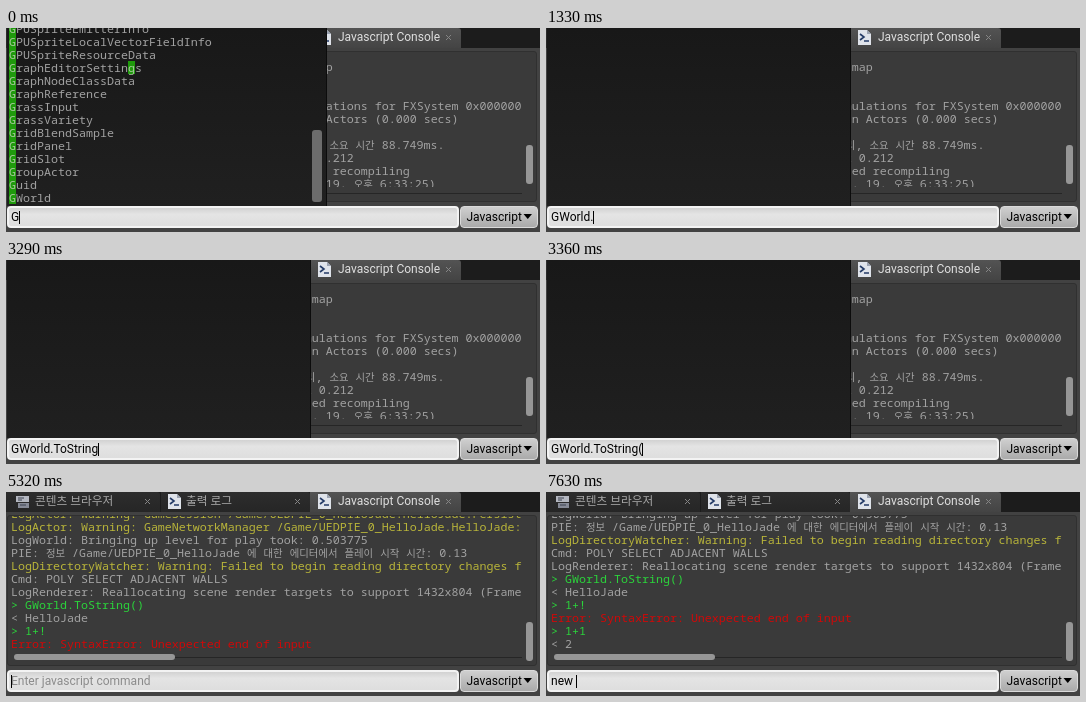
Write an HTML page that moves like this. It is 534x204 px and loops after 8000 ms.

```html
<!DOCTYPE html>
<html lang="ko">
<head>
<meta charset="utf-8">
<title>Javascript Console</title>
<style>
html, body { margin: 0; width: 100%; height: 100%; overflow: hidden; background: #1c1c1c; }
#stage {
  position: relative; width: 534px; height: 204px; overflow: hidden; background: #1c1c1c;
  font: 12px/14px Roboto, "Noto Sans CJK KR", "Noto Sans CJK", sans-serif; white-space: pre;
}
#stage div, #stage svg { position: absolute; box-sizing: border-box; }
#stage [hidden] { display: none; }

.tab { top: 0; height: 20px; background: linear-gradient(#2d2d2d, #262626); color: #a8a8a8; border-radius: 0 3px 0 0; }
.tab.on { background: linear-gradient(#535353, #444); color: #e0e0e0; }
.tab .name { top: 2px; left: 28px; }
.tab .ko { font-size: 11.7px; left: 25px; }
.tab svg { top: 1px; left: 5px; }
.tab.on svg { left: 6px; }
#stage .tab .x { top: 6px; left: auto; right: 9px; }

#panel { left: 0; top: 20px; width: 534px; height: 184px; background: #424242; }
#frame { left: 1px; top: 23px; width: 530px; height: 151px; background: #3a3a3a; border: 1px solid #303030; border-radius: 3px; }
#log { left: 0; top: 24px; width: 516px; height: 135px; overflow: hidden; }
.line, .row { font: 11.667px/13px "Noto Sans Mono", "DejaVu Sans Mono", monospace; height: 13px; color: #a2a2a2; }
.line { left: 5px; }
.line i { font: 10.4px/0 "Noto Sans CJK KR", "Noto Sans CJK", sans-serif; }
.warn { color: #b9b53a; }
.cmd { color: #2bd43b; }
.err { color: #d00808; }
#track { left: 8px; top: 165px; width: 508px; height: 1px; background: #262626; }
.thumb { background: #969696; border-radius: 3px; }
#hbar { left: 8px; top: 162px; width: 161px; height: 6px; }
#vbar { left: 520px; width: 7px; height: 39px; }

#popup { left: 1px; top: 0; height: 178px; background: linear-gradient(#181818, #202020); border-right: 1px solid #0c0c0c; overflow: hidden; }
.row { left: 2px; }
.row b { font-weight: 400; color: #a5c99a; background: #1f9a0c; display: inline-block; height: 13px; }
#pbar { left: 305px; width: 10px; background: #6c6c6c; }

#input, #lang { top: 178px; height: 22px; border-radius: 4px; }
#input { left: 1px; width: 452px; background: linear-gradient(#d2d2d2, #e4e4e4 35%, #dedede); border: 2px solid #f3f3f3; }
#lang { left: 454px; width: 78px; background: linear-gradient(#cfcfcf, #aaa); border: 1px solid #dadada; color: #000; }
#lang div { left: 5.5px; top: 3px; }
#lang svg { left: 62px; top: 7px; }
#text { left: 5px; top: 182px; color: #000; }
#text.empty { color: #8b8b8b; }
#caret { top: 183px; width: 1px; height: 13px; background: #000; }
</style>
</head>
<body>
<div id="stage">
  <div class="tab" style="left:0;width:154px">
    <svg style="left:9px" width="16" height="17"><path d="M1 3h13v6H1z" fill="#b4b7c0"/><path d="M3 10h11v5H3z" fill="#868a96"/><path d="M3 5h6M3 7h4M5 12h6" stroke="#3c4250"/></svg>
    <div class="name ko" style="left:29px">콘텐츠 브라우저</div>
  </div>
  <div class="tab" style="left:155px;width:149px"><div class="name ko">출력 로그</div></div>
  <div class="tab on" style="left:304px;width:151px"><div class="name">Javascript Console</div></div>
  <div id="panel"></div>
  <div id="frame"></div>
  <div id="log"></div>
  <div id="track"></div>
  <div id="hbar" class="thumb"></div>
  <div id="vbar" class="thumb"></div>
  <div id="popup"><div id="pbar" class="thumb"></div></div>
  <div id="input"></div>
  <div id="text"></div>
  <div id="caret"></div>
  <div id="lang"><div>Javascript</div><svg width="10" height="6"><path d="M.5 0h8.5L4.75 5z" fill="#000"/></svg></div>
</div>
<script>
const $ = id => document.getElementById(id);
const LOOP = 8000, PITCH = 13;

function add(parent, cls, top) {
  const el = document.createElement('div');
  el.className = cls;
  el.style.top = top + 'px';
  return parent.appendChild(el);
}

// Puts text into el, wrapping every part that matches re in the given tag.
function fill(el, text, re, tag) {
  text.split(re).forEach((part, i) => {
    if (!part) return;
    const node = i % 2 ? document.createElement(tag) : document.createTextNode('');
    node.textContent = part;
    el.append(node);
  });
}

const closeX = '<svg class="x" width="7" height="7"><path d="M1 1l5 5M6 1l-5 5" stroke="#858585"/></svg>';
const promptIcon = '<svg width="17" height="17"><path d="M2 1h9l4 4v11H2z" fill="#dfe3ea"/>' +
  '<path d="M11 1v4h4" fill="#9ba3b2"/><path d="M4 5l4 3-4 3M8 12h5" fill="none" stroke="#233a66" stroke-width="1.6"/></svg>';
document.querySelectorAll('.tab').forEach((tab, i) =>
  tab.insertAdjacentHTML('beforeend', (i ? promptIcon : '') + closeX));

const before = [
  'LogLoader: Finished saving all of the next map', '', '',
  'LogParticles: Destroying 2 GPU particle simulations for FXSystem 0x000000',
  'LogEditorServer: Finished looking for orphan Actors (0.000 secs)', '',
  'MapCheck: 정보: 맵 검사 완료: 오류 0개, 경고 0개 처리, 소요 시간 88.749ms.',
  'LogTimer: Time in seconds for the last tick 0.212',
  'LogReloads: Module check done, nothing needed recompiling',
  'LogReload: Finished scan of module (2015. 6. 19. 오후 6:33:25)'
];
const watcher = 'LogDirectoryWatcher: Warning: Failed to begin reading directory changes f';
const world = '/Game/UEDPIE_0_HelloJade';
const after = [
  watcher,
  `LogWorld: Bringing World ${world}.HelloJade up for play (`,
  `LogActor: Warning: GameSession ${world}.HelloJade:Persist`,
  `LogActor: Warning: GameNetworkManager ${world}.HelloJade:`,
  'LogWorld: Bringing up level for play took: 0.503775',
  `PIE: 정보 ${world} 에 대한 에디터에서 플레이 시작 시간: 0.13`,
  watcher,
  'Cmd: POLY SELECT ADJACENT WALLS',
  'LogRenderer: Reallocating scene render targets to support 1432x804 (Frame',
  '> GWorld.ToString()', '< HelloJade',
  '> 1+!', 'Error: SyntaxError: Unexpected end of input',
  '> 1+1', '< 2'
];

const tone = s => /Warning/.test(s) ? 'warn' : s[0] === '>' ? 'cmd' : /^Error/.test(s) ? 'err' : '';

// One log view; lastTop is the stage position of its bottom line.
function logView(lines, lastTop) {
  const view = add($('log'), 'view', 0);
  lines.forEach((s, i) => {
    const top = lastTop - (lines.length - 1 - i) * PITCH - 24;
    fill(add(view, 'line ' + tone(s), top), s, /([가-힣]+)/, 'i');
  });
  return view;
}
const logs = [logView(before, 149), ...[11, 13, 15].map(n => logView(after.slice(0, n), 145))];

function rowsView(names, re) {
  const view = add($('popup'), 'rows', 0);
  names.forEach((s, i) => fill(add(view, 'row', i * PITCH - 6), s, re, 'b'));
  return view;
}
const globals = `GPUSpriteEmitterInfo GPUSpriteLocalVectorFieldInfo GPUSpriteResourceData
  GraphEditorSettings GraphNodeClassData GraphReference GrassInput GrassVariety GridBlendSample
  GridPanel GridSlot GroupActor Guid GWorld`.split(/\s+/);
const members = `SphereTraceSingle_NEW SphereTraceSingleByObject_DEPRECATED SphereTraceSingleForObjects
  StaticClass StreamingLevels StreamingLevelsPrefix SuggestProjectileVelocity ThumbnailInfo toJSON
  ToString UnloadStreamLevel UnpauseTimerbyFunctionName UnpauseTimerbyHandle WorldComposition`
  .split(/\s+/).map(s => 'GWorld.' + s);
const lists = {
  globals: { view: rowsView(globals, /(g)/i), bar: 102 },
  members: { view: rowsView(members, /(GWorld\.)/), bar: 127 }
};

// Tracks hold [start time, value] pairs; typed() adds one character per time.
const typed = (base, chars, times) => times.map((t, i) => [t, base + chars.slice(0, i + 1)]);
const text = [
  [0, 'G'],
  ...typed('G', 'World.', [840, 980, 1050, 1120, 1260, 1330]),
  ...typed('GWorld.', 'ToString()', [2590, 2730, 2940, 3010, 3080, 3150, 3220, 3290, 3360, 3430]),
  [3640, ''], ...typed('', '1+!', [4970, 5040, 5110]),
  [5320, ''], ...typed('', '1+1', [5880, 5950, 6020]),
  [6160, ''], ...typed('', 'new ', [7350, 7420, 7560, 7630])
];
const caret = [
  [0, 1], [70, 0], [490, 1], [1820, 0], [2240, 1], [3780, 0], [4060, 1], [4550, 0], [4970, 1],
  [5390, 0], [5880, 1], [6230, 0], [6370, 1], [6790, 0], [7210, 1]
];
const popup = [[0, 'globals'], [840, 'blank'], [1400, 'members'], [2590, 'blank'], [3500, '']];
const log = [[0, 0], [3640, 1], [5320, 2], [6160, 3]];

const at = (track, t) => track.findLast(([start]) => start <= t)[1];

const pen = document.createElement('canvas').getContext('2d');
pen.font = '12px Roboto, sans-serif';

function draw(t) {
  const value = at(text, t), menu = at(popup, t), list = lists[menu], stage = at(log, t);

  $('text').textContent = value || 'Enter javascript command';
  $('text').className = value ? '' : 'empty';
  $('caret').hidden = !at(caret, t);
  $('caret').style.left = Math.floor(5.1 + pen.measureText(value).width) + 'px';

  $('popup').hidden = !menu;
  $('popup').style.width = (list ? 320 : 304) + 'px';
  for (const key in lists) lists[key].view.hidden = key !== menu;
  $('pbar').hidden = !list;
  if (list) {
    $('pbar').style.top = list.bar + 'px';
    $('pbar').style.height = 174 - list.bar + 'px';
  }

  logs.forEach((view, i) => view.hidden = i !== stage);
  $('vbar').style.top = (stage ? 130 : 117) + 'px';
}

const begin = performance.now();
function tick() {
  draw((performance.now() - begin) % LOOP);
  requestAnimationFrame(tick);
}
tick();
</script>
</body>
</html>
```
